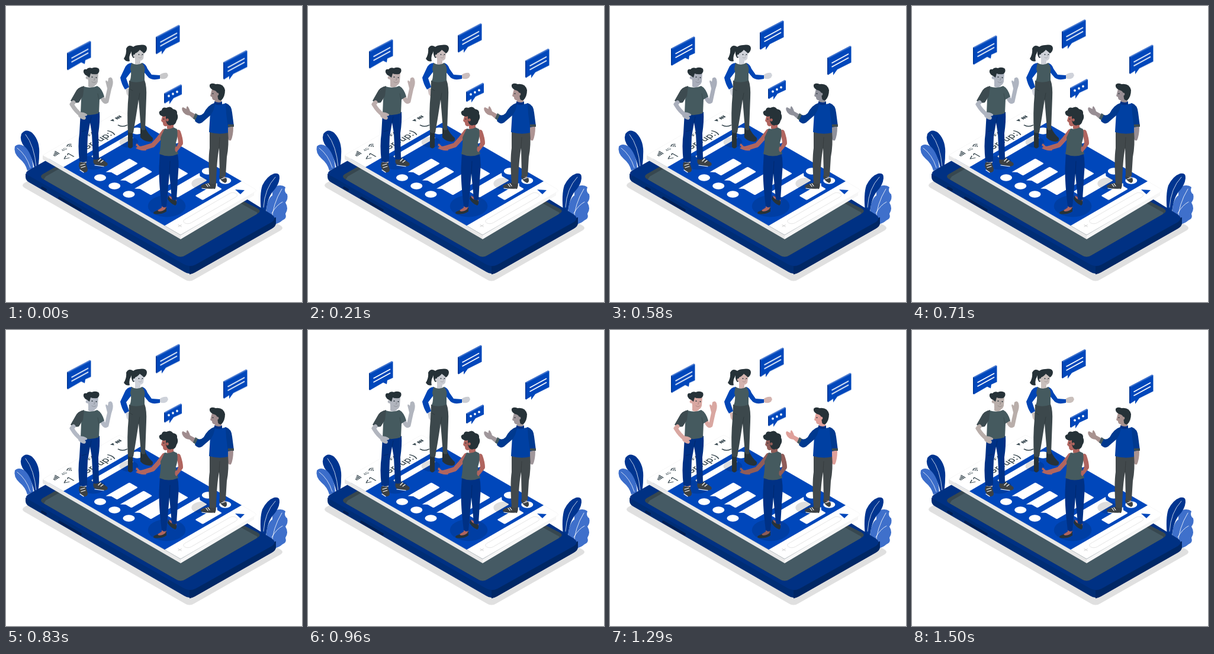
Animation, 500 px wide and 500 px high, one loop 1.54 s. Source, as an HTML page:

```html
<!DOCTYPE html>
<html lang="en">
<head>
<meta charset="utf-8">
<title>Group chat</title>
<style>
html, body { margin: 0; width: 100%; height: 100%; overflow: hidden; background: #fff; }
svg { display: block; width: 100%; height: 100%; }
text { font-family: Inter, Arial, sans-serif; fill: #37474f; }
.skin { fill: currentColor; }
.limb { fill: none; stroke: currentColor; stroke-linecap: round; stroke-linejoin: round; }
.hair { fill: #263238; }
.cloth { fill: #455a5f; }
.cloth2 { fill: #3d4b50; }
.slacks { fill: #42494c; }
.trousers { fill: #003185; }
.blue { fill: #0045b5; }
.sweater { fill: #0040a2; }
.sleeve { fill: #00398f; }
.shoe { fill: #3c4144; }
.white { fill: none; stroke: #fff; stroke-linecap: round; }
.fold { fill: none; stroke: #000; stroke-opacity: .2; stroke-width: .9; stroke-linecap: round; }
.ink { fill: none; stroke: #37474f; stroke-linecap: round; }
</style>
</head>
<body>
<svg viewBox="0 0 500 500">
  <path fill="#e0e0e0" d="M31 299 L180 214 L464 371 Q470 375 464 379 L318 462 Q310 467 302 462 L31 307 Q25 303 31 299Z"/>

  <!-- plants -->
  <g>
    <path fill="#003590" d="M49 278 Q44 252 32 239 Q22 227 26 216 Q33 206 44 214 Q58 228 56 252 Q56 265 53 276Z"/>
    <path class="white" stroke-opacity=".75" d="M33 217 Q48 236 51 272"/>
    <path fill="#3b6dca" d="M36 278 Q33 266 23 258 Q12 248 15 237 Q21 231 31 237 Q44 248 46 274Z"/>
    <path class="white" stroke-opacity=".75" d="M19 240 Q34 251 41 273"/>
    <path fill="#3f70cb" d="M443 365 Q438 350 441 335 Q445 322 450 320 Q449 309 457 304 Q466 301 472 306 Q469 314 475 318 Q477 326 472 332 Q478 342 472 351 Q475 359 467 362 Q458 370 449 368Z"/>
    <path class="white" stroke-opacity=".8" d="M466 309 Q450 335 449 364 M449 350 Q457 336 467 331"/>
    <path fill="#003590" d="M431 348 Q428 318 433 303 Q441 287 453 283 Q463 281 462 291 Q461 302 451 313 Q441 325 439 350Z"/>
    <path class="white" stroke-opacity=".75" d="M455 289 Q437 308 435 340"/>
  </g>

  <!-- phone -->
  <path fill="#002d74" d="M33 283 V289 Q33 295 41 299 L301 449 Q310 455 319 450 L449 376 Q456 372 456 366 V357 L310 400Z"/>
  <path fill="#002765" d="M310 430 V453.500 Q315 452 319 450 L449 376 Q456 372 456 366 V357Z"/>
  <path fill="#003183" d="M39 277 L190 192 L447 351 Q459 358 449 365 L320 437 Q310 442 300 436 L41 288 Q28 283 39 277Z"/>
  <path stroke="#001f54" stroke-width="4" stroke-linecap="round" d="M61 307 L67 310.500 M90 324 L126 345"/>
  <path fill="#37474f" d="M62 284 L180 217 L425 342 Q432 346 426 350 L303 421 Q295 426 287 421 L62 292 Q56 288 62 284Z"/>
  <path fill="#455a64" d="M67 288 L190 218 L421 347 Q427 349 423 352 L303 421 Q295 426 287 421 L64 293Z"/>

  <!-- floating screen -->
  <path fill="#e8e8e8" d="M62 252 L295 387 V394 L62 259Z"/>
  <path fill="#f6f6f6" d="M295 387 L419 314 V320 L295 394Z"/>
  <g id="screen" transform="matrix(.866 -.5 .866 .5 62 252)">
    <path fill="#fff" stroke="#f1f1f1" stroke-width=".5" d="M0 0 H146 Q150 0 150 4 V263 Q150 269 145 269 H0Z"/>
    <rect y="40.400" width="150" height="197.600" fill="#0047bb"/>
    <g fill="#37474f">
      <path d="M10 10 h1.600 v4 h-1.600z M12.600 8.500 h1.600 v5.500 h-1.600z M15.200 7 h1.600 v7 h-1.600z M17.800 5 h1.600 v9 h-1.600z"/>
      <text x="26" y="13.500" font-size="6.500">4G</text>
      <text x="76" y="13.500" font-size="7.500" font-weight="600">9:41</text>
      <path d="M124 7.500 h6 l-3 5z"/>
      <path d="M133 7.500 h2.500 v5 h-2.500z M136.200 7.500 h2.500 v5 h-2.500z M139.400 7.500 h2.500 v5 h-2.500z"/>
      <path class="ink" stroke-width="1.300" d="M38.500 9 q4 -4 8 0 M40.300 11 q2.200 -2 4.400 0"/>
      <circle cx="42.500" cy="13" r="1"/>
      <text x="13" y="33" font-size="16">&lt;1</text>
      <text x="51" y="34" font-size="16" font-weight="500">Group:)</text>
      <path class="ink" stroke-width="1.800" d="M124.500 23 q0 8 8.500 8.500"/>
    </g>
    <rect x="24" y="247" width="100" height="12" rx="6" fill="none" stroke="#d9d9d9" stroke-width=".6"/>
    <path stroke="#ccc" stroke-width=".8" d="M11 253 h7 M14.500 249.500 v7"/>
  </g>
  <path fill="#0047bb" d="M387 310 L403 311 L396 318Z"/>

  <!-- man with raised hand -->
  <g class="person">
    <path class="skin" d="M126 256 h10 v9 h-10z M148 252 h8 v8 h-8z"/>
    <path class="shoe" d="M124 264 L135 265 L138 276 Q138 282 131 281 Q125 278 123 270Z M148 258 L157 256 Q165 261 171 265 Q174 270 166 271 L151 268 Q146 266 148 258Z"/>
    <path class="white" stroke-width="1.200" d="M126 269 l7 -2 M127 273 l7 -2 M156 262 l4 -4 M160 264 l4 -3 M125 277 l6 4 M150 269 l15 2"/>
    <path class="trousers" d="M126 180 L158 179 Q159 195 156 215 L157 258 Q151 261 147 258 L145 215 L142 197 L138 220 Q137 240 137 262 Q130 266 124 262 Q121 235 124 215Z"/>
    <path class="fold" d="M142 197 L144 187 M128 212 l8 -2"/>
    <path class="limb" stroke-width="7" d="M162 153 Q166 164 170 161 L175 138"/>
    <path class="skin" d="M171 139 L169 131 Q167 125 170 126 L172 128 L173 122 Q178 118 180 124 Q182 131 178 140Z"/>
    <path class="skin" d="M139 126 h11 v9 q-5 5 -11 1z"/>
    <path class="cloth" d="M131 136 Q144 140 154 135 Q162 139 166 153 L158 158 L157 181 Q142 187 126 182 L127 158Z"/>
    <path class="cloth2" d="M132 135 Q121 137 117 146 L109 160 Q115 165 123 163 L130 152Z"/>
    <path class="fold" d="M157 158 L155 148"/>
    <path class="limb" stroke-width="7" d="M114 163 L111 166 Q118 178 127 184"/>
    <path class="skin" d="M124 180 Q131 178 137 183 Q138 186 133 186 Q137 189 133 192 Q127 192 122 186Z"/>
    <path class="skin" d="M138 112 Q137 130 144 134 Q152 137 155 128 L156 112Z"/>
    <circle class="skin" cx="137.500" cy="121" r="2.800"/>
    <path class="hair" d="M131 112 Q130 106 136 107 Q139 103 145 105 Q152 102 157 106 Q159 112 154 115 Q147 116 143 114 L141 121 L137 118 Q133 117 131 112Z"/>
    <g class="hair"><circle cx="145.500" cy="120" r="1"/><circle cx="152.500" cy="121" r="1"/></g>
    <path class="fold" d="M149 121 l1 4 h-2 M145 128 q4 3 7 0"/>
  </g>

  <!-- woman with ponytail -->
  <g class="person">
    <path class="hair" d="M215 69 Q207 64 203 72 Q204 81 199 89 Q203 95 209 93 Q207 85 211 79 Q212 75 215 74Z"/>
    <path class="skin" d="M218 88 h9 v9 q-5 5 -9 1z"/>
    <path class="skin" d="M259 117 Q265 112 272 113 L274 117 L272 121 Q267 125 260 122Z M202 138 L210 141 Q215 147 213 153 Q208 156 204 149Z"/>
    <path class="hair" d="M206 212 L214 212 L214 238 Q210 243 206 238Z M227 206 L235 205 Q239 215 248 223 Q249 230 241 229 Q232 228 227 222Z"/>
    <path fill="#3c484c" d="M208 126 L234 125 Q238 135 237 155 L235 209 Q231 211 228 208 L224 158 Q220 185 215 214 Q210 216 206 213 Q204 180 207 150Z"/>
    <path class="fold" d="M224 158 L226 147 M209 140 l5 3"/>
    <path class="blue" d="M213 96 Q204 96 200 106 L193 121 Q195 132 201 141 L208 137 L203 122 L213 109Z M229 96 Q236 97 239 106 L246 116 L260 117 V123 Q247 126 241 121 L230 108Z"/>
    <path class="cloth" d="M212 96 Q221 102 230 96 Q236 104 234 112 L234 126 Q221 131 209 127 Q213 116 210 106Z"/>
    <path class="skin" d="M215 74 Q213 87 221 91 Q228 95 232 89 L234 74Z"/>
    <path class="hair" d="M212 76 Q213 66 225 66 Q237 64 238 71 Q238 77 233 80 Q230 77 226 74 Q222 79 218 80 Q218 87 215 88 Q211 83 212 76Z"/>
    <circle class="skin" cx="217" cy="84" r="2.300"/>
    <g class="hair"><circle cx="224.500" cy="82" r=".9"/><circle cx="230.500" cy="82" r=".9"/></g>
    <path class="fold" d="M228 82 l1 3 M224 87 q3 2 5 0"/>
  </g>

  <!-- man in sweater -->
  <g class="person">
    <path class="skin" d="M375 202 L384 203 Q384 219 380 227 Q375 229 374 220Z"/>
    <path class="skin" d="M362 278 h8 v12 h-8z M345 291 h8 v10 h-8z"/>
    <path class="shoe" d="M361 284 Q367 293 372 290 Q375 297 370 299 Q363 296 360 289Z M345 298 L354 297 Q356 303 353 309 Q340 310 330 307 Q327 303 334 301Z"/>
    <path class="white" stroke-width="1.200" d="M338 301 l3 4 M341 300 l3 4 M364 292 l4 -1 M331 308 q10 2 20 1"/>
    <path class="slacks" d="M344 210 L375 211 Q377 235 373 255 L371 287 Q366 291 361 287 L360 240 Q356 260 355 299 Q349 302 344 299 Q341 260 344 240Z"/>
    <path class="fold" d="M360 240 L361 222"/>
    <path class="skin" d="M320 183 L311 178 Q309 171 306 169 Q304 172 305 174 L299 171 Q296 172 298 177 Q301 184 310 185 L317 191Z"/>
    <path class="cloth" d="M316 190 L320 181 L326 185 L321 194Z"/>
    <path class="sweater" d="M352 163 Q365 168 371 164 Q378 168 379 180 L375 203 V214 Q360 218 343 213 L345 180Z"/>
    <path class="sleeve" d="M354 163 Q341 167 334 181 Q329 186 324 184 L319 194 Q325 201 331 197 L346 184 L350 177Z M371 164 Q381 167 382 180 L385 203 L375 205 L372 182Z"/>
    <path class="cloth2" d="M375 200 h10 v4 h-10z"/>
    <path class="skin" d="M352 152 h12 v12 q-6 3 -11 0z"/>
    <path class="skin" d="M348 140 L345 152 L348 154 Q348 160 354 159 Q362 157 362 141Z"/>
    <path fill="#003185" d="M352 161 q9 4 13 0 v5 q-7 3 -13 -1z"/>
    <path class="hair" d="M344 133 Q347 129 354 132 Q367 130 370 142 Q370 153 364 159 Q359 160 358 156 L357 148 Q356 143 350 142 Q343 139 344 133Z"/>
    <circle class="skin" cx="357" cy="149" r="2.400"/>
    <circle class="hair" cx="349.500" cy="148" r=".9"/>
  </g>

  <!-- woman with curly hair -->
  <g class="person">
    <path class="skin" d="M263 336 h8 v10 h-8z M281 322 h7 v9 h-7z"/>
    <path class="skin" d="M275 320 l9 5 l3 9 l-9 -6z"/>
    <path class="hair" d="M263 341 Q268 344 271 340 L271 347 Q262 353 250 351 Q247 348 254 346Z M274 321 Q278 328 287 328 Q290 334 286 337 Q278 334 273 326Z"/>
    <path class="skin" d="M256 345 L264 340 L270 342 Q266 347 258 347Z"/>
    <path class="limb" stroke-width="8" d="M291 213 Q295 224 295 232 L287 242"/>
    <path class="trousers" d="M260 248 L289 246 Q293 262 291 280 L288 327 Q284 330 280 326 L276 283 L271 339 Q267 342 263 338 Q257 290 259 265Z"/>
    <path class="fold" d="M276 283 L277 262"/>
    <path class="limb" stroke-width="8" d="M267 212 Q258 225 248 235 L232 240"/>
    <path class="skin" d="M235 236 L226 237 L221 232 L219 235 L222 238 L219 240 Q226 245 237 244Z"/>
    <path class="skin" d="M272 196 h11 v11 q-6 3 -11 0z"/>
    <path class="cloth" d="M268 207 Q277 209 283 205 L289 208 Q291 220 287 231 L291 250 Q275 257 259 250 Q262 235 261 222Z"/>
    <path class="blue" d="M287 233 L291 231 L289 236 L291 248Z"/>
    <path class="skin" d="M286 238 Q292 235 293 240 L288 247 Q284 245 286 238Z"/>
    <path class="skin" d="M265 183 L262 194 L265 197 Q265 204 271 203 Q278 200 278 187Z"/>
    <path class="hair" d="M260 184 Q256 178 263 176 Q264 170 271 172 Q278 168 282 174 Q290 175 289 182 Q292 188 288 194 Q286 202 280 201 Q275 203 272 199 L270 194 L270 186 Q265 188 260 184Z"/>
    <circle class="skin" cx="272.500" cy="192.500" r="2.400"/>
    <circle class="hair" cx="266.500" cy="191" r=".9"/>
  </g>

  <g id="bubbles"></g>
</svg>
<script>
const LOOP = 1540;
const screen = document.getElementById('screen');
const bubbles = document.getElementById('bubbles');
const add = (parent, markup) => parent.insertAdjacentHTML('beforeend', markup);

// Chat contents, in the flat coordinates of the phone screen
const chat = [ // x, y, width, height, tail side
  [45, 49, 73, 10.5, 1], [38, 90, 41, 17, -1], [38, 118, 41, 17, -1],
  [38, 146, 73, 27, -1], [60, 183, 58, 20, 1], [80, 217, 38, 15, 1]
];
for (const [x, y, w, h, side] of chat) {
  const edge = side < 0 ? x : x + w;
  add(screen, `<rect x="${x}" y="${y}" width="${w}" height="${h}" rx="2" fill="#fff"/>
    <path fill="#fff" d="M${edge - side * 2} ${y} h${side * 7} l${-side * 7} 8z"/>`);
}
for (const [x, y] of [[18, 94], [18, 122], [18, 150], [133, 51], [134, 188], [135, 221]])
  add(screen, `<circle cx="${x}" cy="${y}" r="8.2" fill="#fff"/>`);
for (const [x, y, r] of [[37, 62, 17], [106, 62, 13], [35, 207, 26], [107, 203, 14]])
  add(screen, `<circle cx="${x}" cy="${y}" r="${r}" fill="#000" opacity=".13"/>`);

// Floating speech bubbles
function bubble(x, y, w, h, tail, inner) {
  const rise = w * .5, base = rise + h;
  const low = px => base - px * .54;
  const tip = tail < w / 2 ? tail : tail + 6;
  add(bubbles, `<g><g transform="translate(${x} ${y})">
    <path fill="#3d70cc" d="M0 ${rise} L${w - 2} 0 L${w} 1 L2 ${rise + 2}Z"/>
    <path fill="#003590" d="M0 ${rise} L2 ${rise + 1} V${base} L0 ${base - 1}Z"/>
    <path fill="#0047bb" d="M1.500 ${rise + 1.5} L${w} 1 V${low(w) + 1} L${tail + 7} ${low(tail + 7)}
      L${tip} ${low(tip) + 6} L${tail} ${low(tail)} L1.500 ${base}Z"/>${inner}</g></g>`);
}
const lines = '<path class="white" stroke-width="1.7" d="M8 29 L35.500 14 M8 35.500 L35.500 20.500"/>';
const dots = [[8, 19.5], [15, 16], [22, 12.5]]
  .map(([x, y]) => `<circle cx="${x}" cy="${y}" r="1.9" fill="#fff"/>`).join('');
bubble(103, 59.4, 40.5, 29, 24, lines);
bubble(253, 32.4, 40.5, 29, 10, lines);
bubble(367, 75.2, 40.5, 29, 10, lines);
bubble(267, 133, 30, 17, 9, dots);

for (const b of bubbles.children)
  b.animate(
    ['translateY(0)', 'translateY(-10px)', 'translateY(0)'].map(transform => ({ transform })),
    { duration: LOOP, iterations: Infinity, iterationStart: 40 / LOOP });

// Skin tints over the loop, one row per person
const times = [0, 380, 580, 830, 1080, 1290, 1500];
const tints = [
  '#b2b2b4 #c5aba8 #a9aebb #b3b9c5 #b0b2b7 #d9a7a1 #b9aeaa',
  '#c8c8ca #cbb5b2 #d0d3da #ced2da #c6c6ca #d4b3ae #c9bfbb',
  '#9c8a8a #bd9c9a #8f919b #a08c8e #a0a1a7 #dfa09a #a8928f',
  '#b0655f #b0655f #b0655f #b0655f #b0655f #8f5c58 #b0655f'
];
document.querySelectorAll('.person').forEach((person, i) => {
  const row = tints[i].split(' ');
  const frames = row.map((color, k) => ({ color, offset: times[k] / LOOP }));
  person.animate([...frames, { color: row[0], offset: 1 }], { duration: LOOP, iterations: Infinity });
});
</script>
</body>
</html>
```
